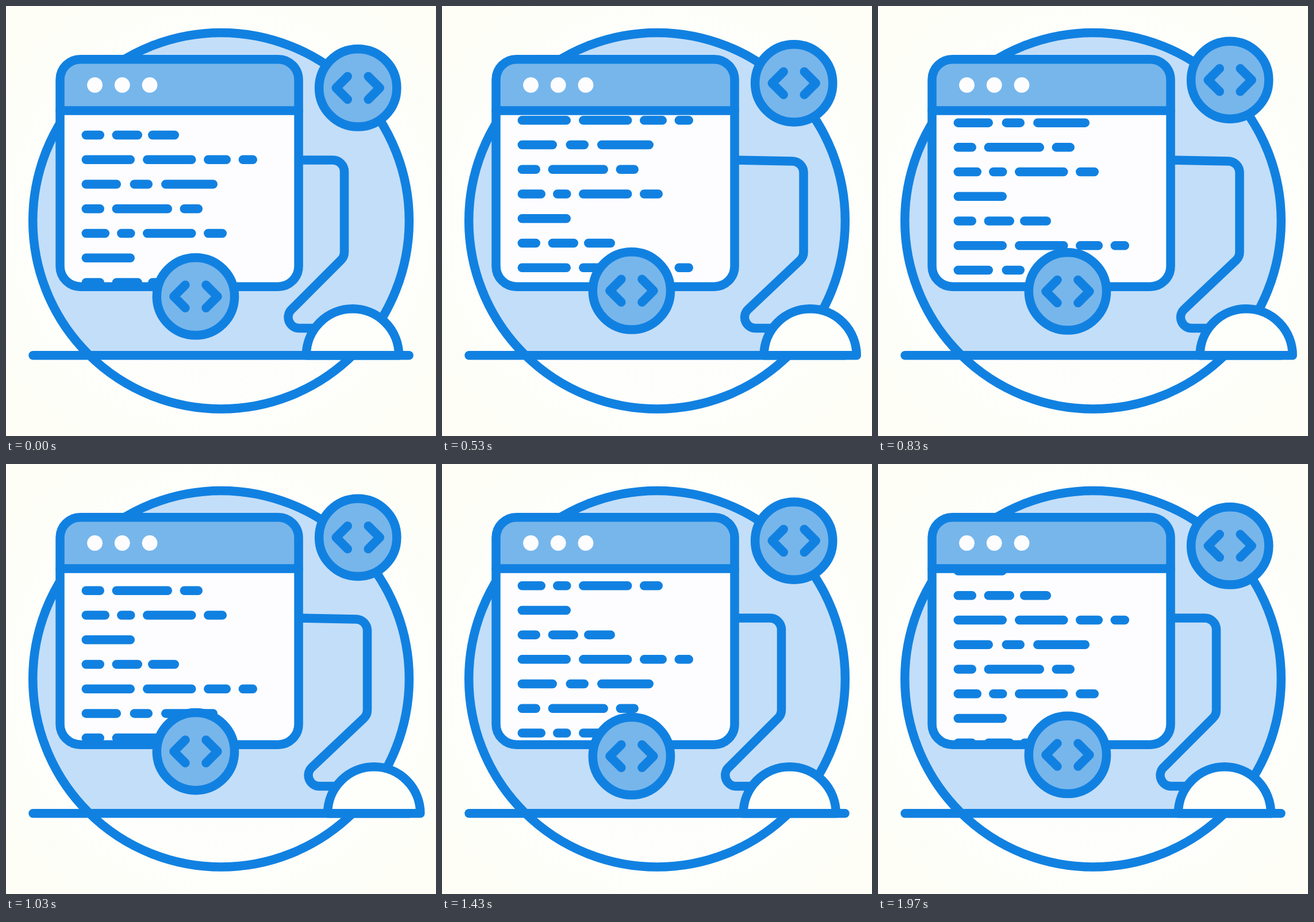
Write an HTML page that moves like this. It is 748 px wide and 748 px high and loops after 2000 ms.

```html
<!DOCTYPE html>
<html lang="en">
<head>
<meta charset="utf-8">
<title>Coding window</title>
<style>
  html, body { margin: 0; width: 100%; height: 100%; overflow: hidden; background: #fefefb; }
  svg { display: block; width: 100vw; height: 100vh; }
  .ink { fill: none; stroke: #1181e1; stroke-width: 15.5; stroke-linecap: round; stroke-linejoin: round; }
  .pale { fill: #c3def8; }
  .mid { fill: #77b6eb; }
  .paper { fill: #fdfdff; }
  .ground { fill: #fefefa; }
</style>
</head>
<body>
<svg viewBox="0 0 748 748">
  <defs>
    <radialGradient id="back" cx="374" cy="374" r="500" gradientUnits="userSpaceOnUse">
      <stop offset=".3" stop-color="#fdfdff"/>
      <stop offset="1" stop-color="#fefef6"/>
    </radialGradient>
    <clipPath id="sky"><rect width="748" height="608"/></clipPath>
    <clipPath id="page"><rect x="94" y="182" width="415" height="306"/></clipPath>
    <clipPath id="frame"><rect x="94" y="92.7" width="415" height="395.5" rx="35.5"/></clipPath>
    <g id="badge">
      <circle class="ink mid" r="67.6" style="fill:#77b6eb"/>
      <path class="ink" d="M-18-20L-38 0L-18 20M18-20L38 0L18 20"/>
    </g>
  </defs>

  <rect width="748" height="748" fill="url(#back)"/>
  <circle class="pale" cx="374" cy="373.7" r="327.3" clip-path="url(#sky)"/>
  <circle class="ink" cx="374" cy="373.7" r="327.3"/>

  <path id="cable" class="ink"/>
  <path class="ink" d="M47 607.8H701"/>
  <g id="mouse">
    <path class="ink" style="fill:#fefefa" d="M522.3 607.8a80.6 81 0 0 1 161.2 0z"/>
  </g>

  <g clip-path="url(#frame)">
    <rect class="paper" x="94" y="92" width="415" height="397"/>
    <rect class="mid" x="94" y="92" width="415" height="90"/>
  </g>
  <g class="paper">
    <circle cx="154.5" cy="137.4" r="13.4"/>
    <circle cx="202.2" cy="137.4" r="13.4"/>
    <circle cx="250" cy="137.4" r="13.4"/>
  </g>
  <g clip-path="url(#page)"><path id="code" class="ink"/></g>
  <rect class="ink" x="94" y="92.7" width="415" height="395.5" rx="35.5"/>
  <path class="ink" d="M94 182H509"/>

  <use id="low" href="#badge"/>
  <use id="high" href="#badge"/>
</svg>
<script>
  const LOOP = 2000, FRAMES = 60, ROW = 42.73, CAP = 7.75;
  // Left and right edges of the dashes in each line of code
  const lines = [
    [131.5, 171, 184.5, 237, 247, 301],
    [131.5, 224, 238, 330.5, 344, 391, 404.5, 437],
    [131.5, 200, 215.5, 255, 270, 368],
    [131.5, 171, 184.5, 289, 302.5, 342],
    [131.5, 180, 193, 224.5, 238, 330.5, 344, 384],
    [131.5, 224]
  ];
  const get = id => document.getElementById(id);
  const code = get('code'), cable = get('cable'), mouse = get('mouse');
  const low = get('low'), high = get('high');

  let dashes = '';
  for (let row = 0; row < 14; row++) {
    const line = lines[row % lines.length];
    const y = 224.5 + row * ROW;
    for (let i = 0; i < line.length; i += 2)
      dashes += `M${line[i] + CAP} ${y}H${line[i + 1] - CAP}`;
  }
  code.setAttribute('d', dashes);

  const move = (el, x, y) => el.setAttribute('transform', `translate(${x} ${y})`);
  const smooth = u => {
    u = Math.min(1, Math.max(0, u));
    return u * u * (3 - 2 * u);
  };
  const bob = (t, peak) => 7.3 * Math.cos(2 * Math.PI * (t - peak) / LOOP);

  function cablePath(p) {
    const side = 588.5 + 40.5 * p, bend = 582.6 + 40.5 * p, loop = 510 + 35.5 * p;
    return `M509 268L${568.5 + 41.5 * p} ${268 + 2 * p}` +
      `A20 20 0 0 1 ${side} ${288 + p}V428` +
      `A20 20 0 0 1 ${bend} 442.1L${loop - 13.4} 528.1` +
      `A19 19 0 0 0 ${loop} 560.5H${560 + 37.5 * p}`;
  }

  function draw(now) {
    // Thirty poses a second
    const t = Math.floor((now % LOOP + 5) * FRAMES / LOOP) % FRAMES * LOOP / FRAMES;
    const p = smooth(t / 500) - smooth((t - 1000) / 500);
    move(code, 0, -t / LOOP * ROW * lines.length);
    move(mouse, 37.7 * p, 0);
    cable.setAttribute('d', cablePath(p));
    move(high, 612.2, 135.1 + bob(t, 0));
    move(low, 329.9, 502.3 + bob(t, 1633));
  }

  const start = performance.now();
  function tick() {
    draw(performance.now() - start);
    requestAnimationFrame(tick);
  }
  tick();
</script>
</body>
</html>
```
